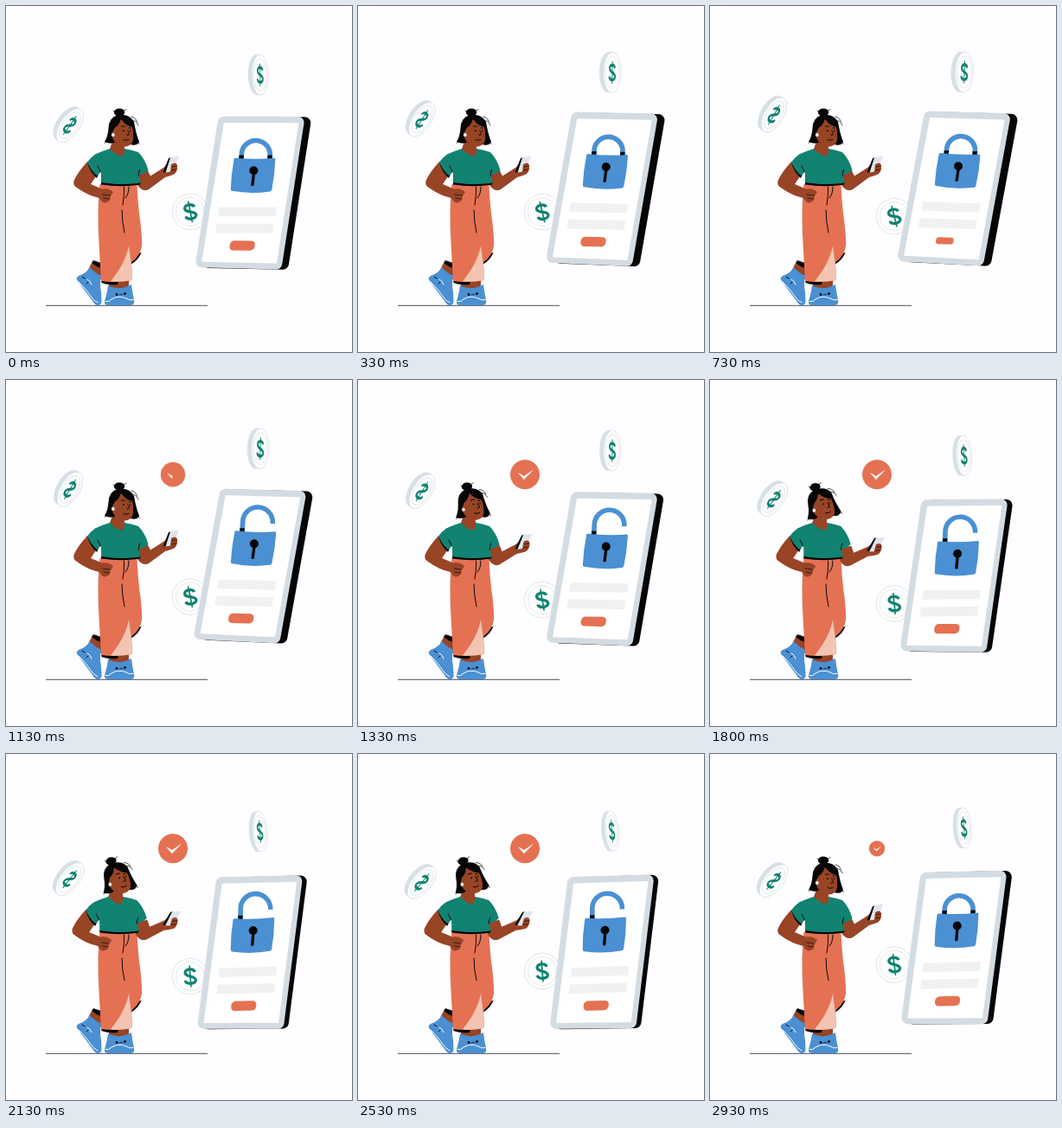
Animation, 400 px wide and 400 px high, one loop 3000 ms. Source, as an HTML page:

```html
<!DOCTYPE html>
<html lang="en">
<head>
<meta charset="utf-8">
<title>Unlocking a phone</title>
<style>
html, body { margin: 0; width: 100%; height: 100%; overflow: hidden; background: #fefdff; }
svg { display: block; width: 100vw; height: 100vh; }
.line { fill: none; stroke: #0b0b0d; stroke-width: 1; stroke-linecap: round; stroke-linejoin: round; }
.fine { stroke-width: .7; }
.white { stroke: #fff; }
.skin { fill: #984425; }
.ink { fill: #060607; }
.blue { fill: #4a90d3; }
.coral { fill: #e57153; }
.green { fill: #128271; }
.bar { fill: #f0f1f2; }
.rim { fill: #d7e0e6; }
.face { fill: #fff; stroke: #d9dfe4; stroke-width: .8; }
.ring { fill: none; stroke: #dce2e6; stroke-width: .8; }
.cash { fill: none; stroke: #128271; stroke-width: 3.3; }
</style>
</head>
<body>
<svg viewBox="0 0 400 400">
  <defs>
    <g id="dollar" class="cash">
      <path d="M5.6-4.6C4.6-9.2-5.6-9.4-5.6-4.4C-5.6.6 6 -.6 6 4.8C6 9.4-5.2 9.6-6.2 4.4"/>
      <path d="M0-12.5V12.5" stroke-width="1.7"/>
    </g>
    <clipPath id="wipe"><rect id="wiper" x="-9" y="-9" height="18"/></clipPath>
  </defs>

  <g id="flatCoin">
    <circle class="face" r="20.7"/>
    <circle class="ring" r="16.5"/>
    <use id="flatSign" href="#dollar"/>
  </g>
  <g id="topCoin"></g>
  <g id="leftCoin"></g>

  <g id="badge">
    <circle class="coral" r="17"/>
    <path d="M-8.2-2.2L-1.2 6L10.5-6L-1 1.6z" fill="#fff" clip-path="url(#wipe)"/>
  </g>

  <g id="phone">
    <g stroke-width="14" stroke-linejoin="round">
      <polygon id="back" class="ink" stroke="#060607" points="-30.5,-80.5 55.3,-80.5 30.5,82 -55.3,80.5"/>
      <polygon fill="#d3dce2" stroke="#d3dce2" points="-30.5,-81 55.3,-81 30.5,82 -55.3,80"/>
    </g>
    <polygon fill="#fff" stroke="#fff" stroke-width="2" stroke-linejoin="round" points="-29.5,-79.5 55,-79.5 30.3,81 -54.3,79.3"/>
    <path id="shackle" fill="none" stroke="#4a90d3" stroke-width="5.6"/>
    <path class="ink" d="M-12.6-43h5.4l-.3 5h-5.4z"/>
    <path id="collar" class="ink" d="M20.4-43h5.4l-.3 5h-5.4z"/>
    <path class="blue" d="M-17-39.8Q6-37.8 28-39.8Q29.4-39.6 29.2-37.8Q28.6-20 25.3-3.4Q25-1.6 23-1.2Q1 2.2-20.5-1.6Q-22.3-2-22.2-3.8Q-21.8-21-18.6-38.3Q-18.3-39.8-17-39.8z"/>
    <circle class="ink" cx="4.3" cy="-25.3" r="5"/>
    <path class="ink" d="M3-24L6.2-24L4.6-8.1Q3-7.1 1.2-8.1z"/>
    <polygon class="bar" points="-35.5,17 31,17 29.5,27.5 -37.2,27.5"/>
    <polygon class="bar" points="-38.3,36.2 28,36.2 26.4,47 -40,47"/>
    <g id="button"><rect class="coral" x="-14.5" y="-5.6" width="29" height="11.2" rx="4.6" transform="skewX(-7)"/></g>
  </g>

  <path d="M46 346.3H233" stroke="#3c3c40" stroke-width=".9"/>

  <!-- shoes -->
  <path class="skin" d="M99 297L112 300L110 316L95 305z"/>
  <path class="ink" d="M101 294L113 298L112 304Q105 302 99 297z"/>
  <path class="blue" d="M97 302Q103 309 110 311.5Q108 322 110 331L110.5 342Q110 346 106 346Q103 346 100 341L83 318Q80 314 84 312Q93 309 97 302z"/>
  <path class="line white" d="M84 319Q93 328 96 333Q101 341 106 343M94 316q4 2 5 6"/>
  <path class="line" d="M88 313l3 2M93 321l2-2"/>
  <path class="skin" d="M119 316H142V328H119z"/>
  <path class="blue" d="M118 323Q130 330 145 322Q146 331 148 340Q149 346 144 346H118Q113 346 114 341Q117 332 118 323z"/>
  <path class="line white" d="M115 341.5Q119 343 122 339Q130 334 139 338Q143 341 147 339.5"/>
  <circle class="ink" cx="128" cy="333.5" r="1.4"/>
  <circle class="ink" cx="137.5" cy="332.5" r="1.4"/>
  <path class="line fine" d="M131 334q2-1 4-.8"/>

  <!-- trousers -->
  <path class="ink" d="M144 299Q153 294 156.5 285L150 286z"/>
  <path class="ink" d="M110 316L130 317L129 322Q118 323 110.5 320z"/>
  <path class="coral" d="M108.5 206H151.5Q152 222 154 240Q157.5 264 157 277Q156 288 145 296.5L146 317Q128 320.5 110 318Q109 300 107.5 275Q105 235 108.5 206z"/>
  <path fill="#f2c5b3" d="M142 277Q139 292 130 306Q125 313 121 318.5Q134 319.3 146 317L144.5 296z"/>
  <path class="line" d="M136.5 209Q137 220 135 230M142 209Q142 218 138 222M134 236Q134 249 137 262"/>

  <!-- torso and arms -->
  <g id="forearm">
    <path class="skin" d="M150 194L163 189L167 196.5L182 187Q186 183 190 182Q197 179 198 186Q198 193 193 195Q188 197 184 198L165 212Q158 215.5 152 207z"/>
    <path class="ink" d="M181.5 192L188 176L191 175L185.5 192.5z"/>
    <path d="M190 175.2L198.6 173.3Q200 173.4 199.5 175L193 191L184.5 192.6z" fill="#dfe6eb"/>
    <path class="skin" d="M191 183Q197 179 198 185Q198 192 193 195Q188 196 190 191z"/>
    <path class="line fine" d="M192 186l5-1.3M191.5 190l5-1"/>
  </g>
  <g id="torso">
    <path class="skin" d="M94 180Q83 192 78.5 202Q77 207 82 210Q94 219 108 222Q111 228 115 227.5Q121 226 121 220L124 215Q119 210 111 211.5L98 206L106 194z"/>
    <path class="line fine" d="M112 218l8 1M113 222l6 1"/>
    <path class="ink" d="M94 181Q97 192 105 199L108 192z"/>
    <path class="ink" d="M110 203Q134 208 156 203L155 206.5Q134 210 110 206.5z"/>
    <path class="green" d="M120 165Q110 168 103 171.5Q97 176 94 180.5Q98 190 105 196L110 191.5L110 204Q134 207.5 156 204.5L153 196Q160 194.5 164.5 190Q161 177 153 169Q146 166.5 137 165z"/>
    <path class="line" d="M109.5 192L106 185M153 196L154.5 189" stroke-width=".8"/>
    <path class="skin" d="M120 165L124 154H136L137 165Q138 171 134 174Q125 171 120 165z"/>
  </g>

  <g id="head">
    <ellipse class="ink" cx="131" cy="123" rx="6.2" ry="4.6"/>
    <path class="ink" d="M129 126Q143 124 148 134Q150 147 154 157Q151 162 146 160.5L128 157Q121 160.5 114 157Q118 150 118.5 141Q119 129 129 126z"/>
    <path class="line fine" d="M126 123l-2-2M136 121l3-1.5M145 128q5 1 6.5 6M147 132q4 1 6 6M116 157l-2 1.5M152 157l2.5 2.5"/>
    <path class="skin" d="M133 131Q144 132 146.5 142Q148.5 156 144.5 160Q139 164 132 162Q124 158 122.5 150Q121 136 133 131z"/>
    <path class="ink" d="M122 147Q121 131 133 129Q132 137 125.5 141Q124.5 144 122 147z"/>
    <path class="ink" d="M132 129Q144 128 148 140Q140 140 133 131z"/>
    <path class="line" d="M133.5 139.5q2-1.3 4-.3M142 141q1.5-.7 2.5 0M140.8 144q2.4 4 1 5l-2 .2M136 154.5q3 1.7 6 0" stroke-width=".9"/>
    <circle class="ink" cx="136" cy="144.2" r=".9"/>
    <circle class="ink" cx="143.6" cy="144.2" r=".8"/>
    <circle cx="123.8" cy="149" r="1.9" fill="#fff"/>
  </g>
</svg>
<script>
const LOOP = 3000, SWAY = 3400;
const el = id => document.getElementById(id);
const put = (id, transform) => el(id).setAttribute('transform', transform);
const wave = (t, peak) => Math.cos(2 * Math.PI * (t - peak) / SWAY);
const ease = (t, from, to) => {
  const p = Math.min(1, Math.max(0, (t - from) / (to - from)));
  return p * p * (3 - 2 * p);
};
// Rises to 1, holds, then falls back to 0.
const hold = (t, a, b, c, d) => ease(t, a, b) - ease(t, c, d);

// Thick coin seen at an angle; rx is the half width of its face.
function drawCoin(id, rx, ry, depth, signWidth) {
  const oval = (cls, k, x) =>
    `<ellipse class="${cls}" cx="${x}" rx="${rx * k}" ry="${ry * k}"/>`;
  const h = depth / 2;
  el(id).innerHTML = oval('rim', 1, -h) +
    `<rect class="rim" x="${-h}" y="${-ry}" width="${depth}" height="${2 * ry}"/>` +
    oval('face', 1, h) + oval('ring', .8, h) +
    `<use href="#dollar" transform="translate(${h}) scale(${signWidth} 1.05)"/>`;
}
drawCoin('topCoin', 9.5, 23.4, 4.6, .52);
drawCoin('leftCoin', 11, 22.3, 4.6, -.62);

function draw(t) {
  put('phone', `translate(282 ${220 - 10 * wave(t, 600)}) rotate(${1.8 * wave(t, 800)})`);
  put('back', `translate(${7 + 1.7 * wave(t, 600)} 0)`);
  put('flatCoin', `translate(213 ${248 - 10.5 * wave(t, 140)})`);
  put('flatSign', `rotate(${-9 - 5 * wave(t, 600)})`);
  put('topCoin', `translate(291.5 ${83 - 7 * wave(t, 580)}) rotate(${-1.5 + 3.5 * wave(t, 800)}) scale(${.98 + .12 * wave(t, 800)} 1)`);
  put('leftCoin', `translate(72 ${135.7 - 11.5 * wave(t, 900)}) rotate(${35 - 5 * wave(t, 900)})`);

  put('button', `translate(-8.7 61.5) scale(${1 - .3 * hold(t, 530, 730, 740, 940)})`);

  const open = hold(t, 830, 1080, 2600, 2840);
  const y = -46.6 - 3.8 * open, x = 23 + 2 * open;
  el('shackle').setAttribute('d',
    `M-10-39L-9.6 ${y}A16.6 16.6 0 0 1 ${x} ${y}L${x} ${-39 - 10 * open}`);
  el('collar').setAttribute('opacity', open < .1 ? 1 : 0);

  put('badge', `translate(193 109.3) scale(${ease(t, 930, 1200) * (1 - ease(t, 2760, 3120))})`);
  el('wiper').setAttribute('width', 20 * ease(t, 1000, 1300));

  const look = hold(t, 1180, 1470, 2600, 2880);
  put('head', `rotate(${-13 * look} 130 165)`);
  put('torso', `translate(${-1.8 * look} 0)`);
  put('forearm', `translate(${-2.5 * look} ${look}) rotate(${9 * look} 154 208)`);
}

function tick(now) {
  draw(now % LOOP);
  requestAnimationFrame(tick);
}
draw(0);
requestAnimationFrame(tick);
</script>
</body>
</html>
```
